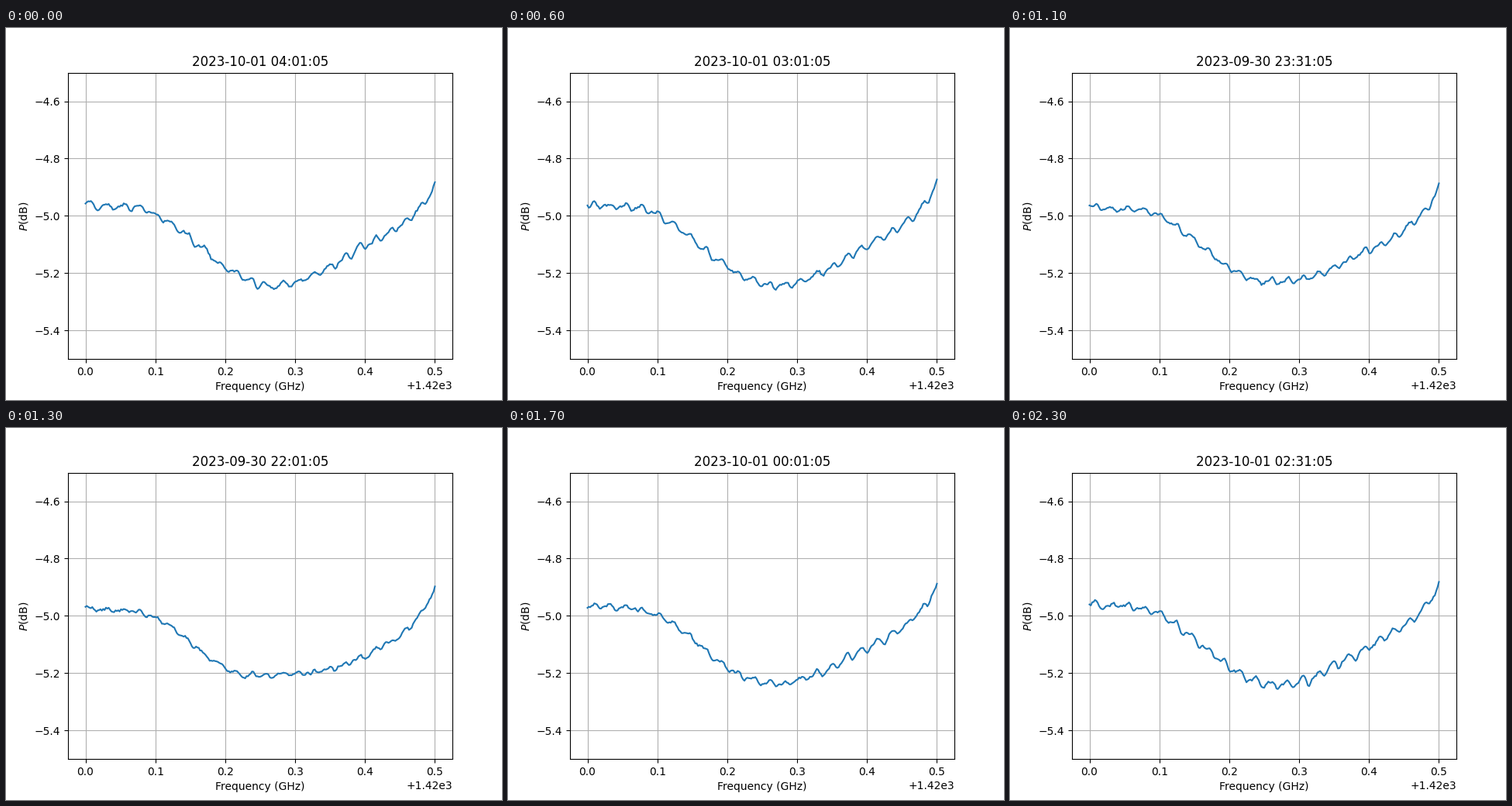
A matplotlib script for the animation above (2400 ms loop, 640 px wide and 480 px high).

```python
import numpy as np
import matplotlib.pyplot as plt
from matplotlib.animation import FuncAnimation

STEPS = 24  # 100 ms each; the first spectrum is held for two steps
SAMPLES = 257
PERIOD = 0.0224  # spacing of the standing-wave ripple

# Shuffled half-hour slots, counted from 20:01:05
ORDER = [16, 6, 21, 11, 0, 14, 9, 18, 3, 22, 7, 12,
         4, 17, 1, 10, 8, 20, 19, 5, 15, 2, 13]

freq = np.linspace(0, 0.5, SAMPLES)

# Smooth bandpass through a few key levels
trend = np.polyval(np.polyfit([0, 0.05, 0.15, 0.25, 0.35, 0.45, 0.5],
                              [-4.957, -4.967, -5.08, -5.237, -5.177, -5.035, -4.89],
                              6), freq)

# Ripple with a fast rise and a slower fall, slightly delayed mid-band
phase = 2 * np.pi * (freq - 0.0075 - 0.006 * np.sin(2 * np.pi * freq)) / PERIOD
ripple = 0.010 * np.cos(phase) + 0.003 * np.sin(2 * phase)


def bump(center, width):
    return np.exp(-((freq - center) / width) ** 2)


early_drift = 0.06 * bump(0.28, 0.055) - 0.03 * bump(0.425, 0.07) - 0.014
late_drift = 0.092 * bump(0.315, 0.07) + 0.018 * np.cos(np.pi * freq)


def spectrum(slot):
    early = np.clip((9 - slot) / 6, 0, 1)
    late = np.clip((slot - 16) / 3, 0, 1)
    rng = np.random.default_rng(slot)
    noise = np.convolve(rng.normal(0, 0.007, SAMPLES + 2), np.ones(3) / 3, "valid")
    return (trend + (1 - 0.4 * early) * ripple
            + early * early_drift + late * late_drift + noise)


def stamp(slot):
    hour, minute = divmod(20 * 60 + 1 + 30 * slot, 60)
    day = "2023-09-30" if hour < 24 else "2023-10-01"
    return f"{day} {hour % 24:02d}:{minute:02d}:05"


fig, ax = plt.subplots(figsize=(6.4, 4.8), dpi=100)
line, = ax.plot(1420 + freq, spectrum(ORDER[0]))
title = ax.set_title(stamp(ORDER[0]))
ax.set_ylim(-5.5, -4.5)
ax.set_xlabel("Frequency (GHz)")
ax.set_ylabel("$P$(dB)")
ax.grid()


def update(step):
    slot = ORDER[max(step - 1, 0)]
    line.set_ydata(spectrum(slot))
    title.set_text(stamp(slot))
    return line, title


anim = FuncAnimation(fig, update, frames=STEPS, interval=100, repeat=True)
plt.show()
```
